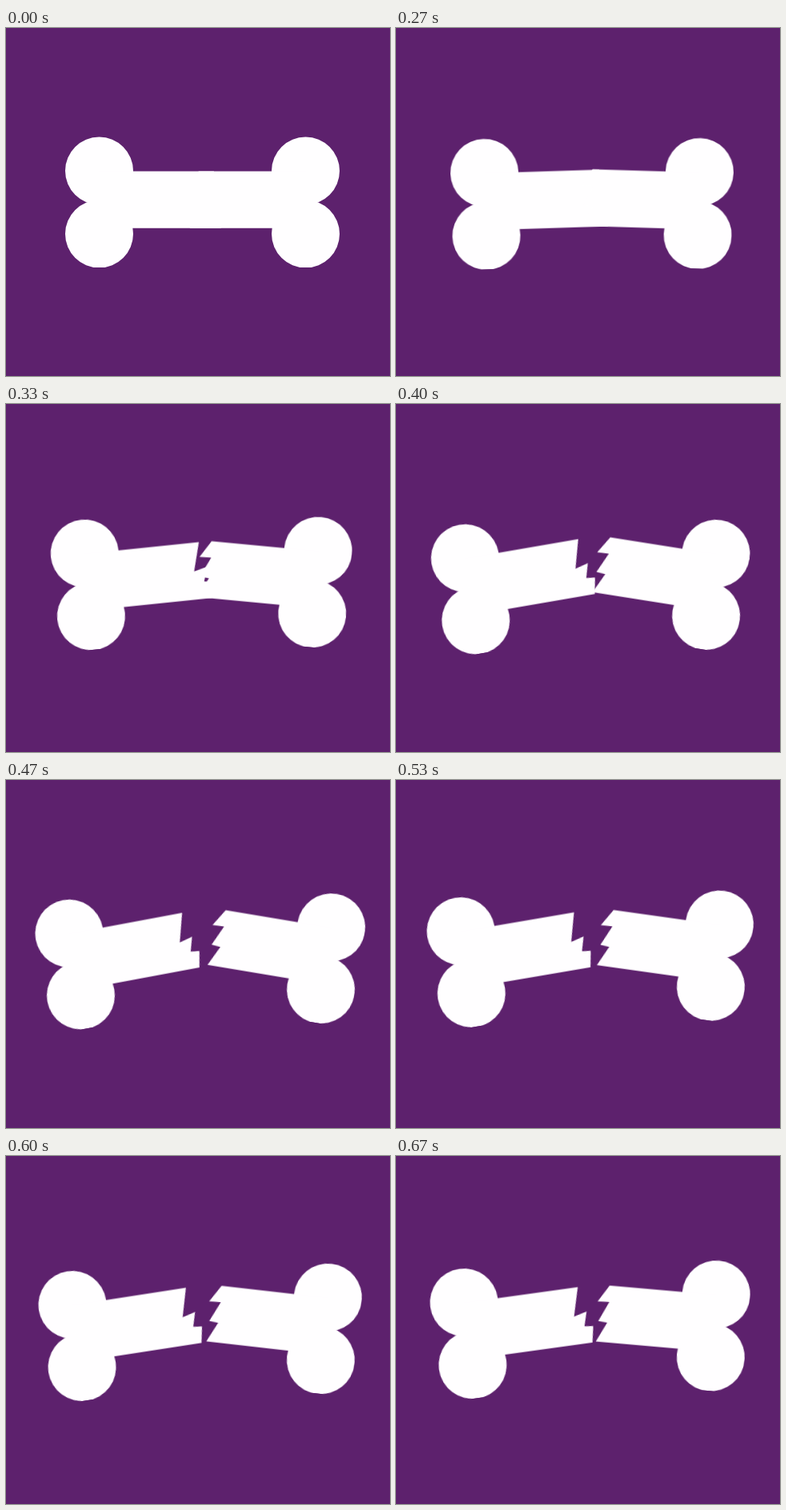
An HTML page without scripts that plays this animation: 480x436 px, repeating every 1.34 s.

```html
<!DOCTYPE html>
<html lang="en">
<head>
<meta charset="utf-8">
<title>Breaking bone</title>
<style>
  html, body { margin: 0; width: 100%; height: 100%; overflow: hidden; background: #5d216d; }
  svg { display: block; width: 480px; height: 436px; fill: #fffeff; }
  .half { animation: 1340ms step-end infinite; }
  .left { transform-origin: 116.5px 179px; animation-name: snap-left; }
  .right { transform-origin: 374.5px 179px; animation-name: snap-right; }

  /* Each half pivots about its upper knob: swing out, then settle back. */
  @keyframes snap-left {
    0% { transform: none; }
    20.149% { transform: translate(-6px, 2.5px) rotate(-1.8deg); }
    24.627% { transform: translate(-18.2px, 8.3px) rotate(-5.9deg); }
    29.851% { transform: translate(-30.2px, 14.2px) rotate(-9.8deg); }
    35.075% { transform: translate(-37.5px, 13.3px) rotate(-10.6deg); }
    39.552% { transform: translate(-35.5px, 10.5px) rotate(-9.7deg); }
    44.776% { transform: translate(-33.5px, 7.5px) rotate(-8.8deg); }
    50%, 100% { transform: translate(-31.5px, 4.5px) rotate(-7.9deg); }
  }
  @keyframes snap-right {
    0% { transform: none; }
    20.149% { transform: translate(5px, 1.5px) rotate(1.7deg); }
    24.627% { transform: translate(15.7px, 5px) rotate(5.4deg); }
    29.851% { transform: translate(25.5px, 8.5px) rotate(9deg); }
    35.075% { transform: translate(32.1px, 5.7px) rotate(9.5deg); }
    39.552% { transform: translate(30px, 2px) rotate(8deg); }
    44.776% { transform: translate(27.9px, -1.7px) rotate(6.5deg); }
    50%, 100% { transform: translate(25.8px, -5.5px) rotate(5deg); }
  }
</style>
</head>
<body>
<svg viewBox="0 0 480 436" role="img" aria-label="A bone snapping in two">
  <defs>
    <clipPath id="bounds"><rect x="70" y="130" width="346.3" height="169.5"/></clipPath>
    <g id="knobs">
      <circle cy="179" r="42.5"/>
      <circle cy="258" r="42.5"/>
    </g>
  </defs>
  <g class="half left">
    <g clip-path="url(#bounds)">
      <use href="#knobs" x="116.5"/>
      <path d="M116 179.6H260L250.3 215.5 266.7 211.3 261.6 229.3 272.5 230.5 268.7 250.7H116Z"/>
    </g>
  </g>
  <g class="half right">
    <g clip-path="url(#bounds)">
      <use href="#knobs" x="374.5"/>
      <path d="M375 179.6H240.8L227.6 200.6 242.2 200.1 230.5 224.9 241.8 225.9 229.7 250.8H375Z"/>
    </g>
  </g>
</svg>
</body>
</html>
```
